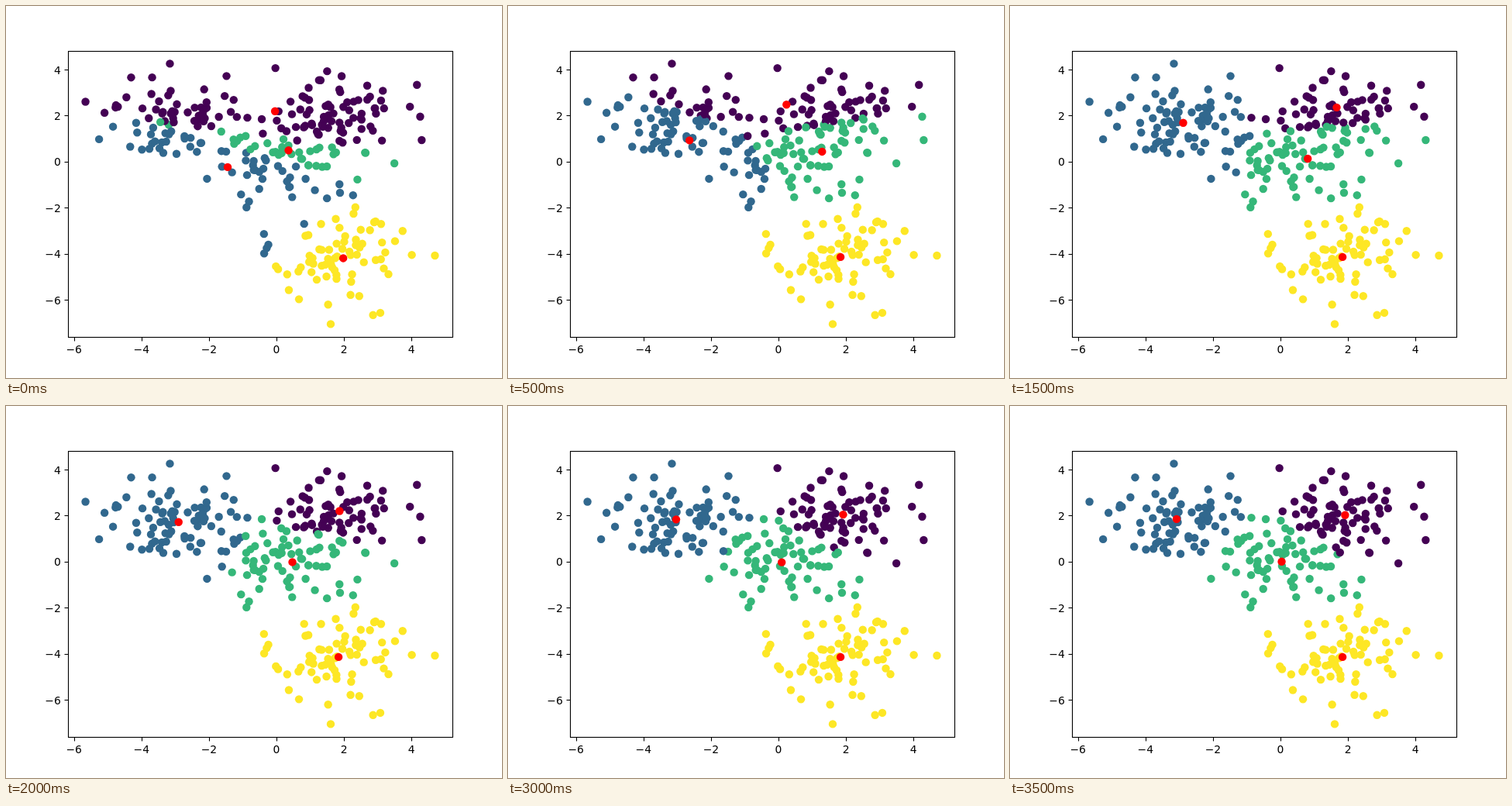
Write an HTML page that moves like this. It is 640 px wide and 480 px high and loops after 4.5 s.

```html
<!DOCTYPE html>
<html lang="en">
<head>
<meta charset="utf-8">
<title>k-means clustering</title>
<style>
  html, body { margin: 0; width: 100%; height: 100%; overflow: hidden; background: #fff; }
  svg { display: block; width: 640px; height: 480px; }
  text { font: 13.89px "DejaVu Sans", sans-serif; fill: #000; }
  .axes { fill: none; stroke: #000; stroke-width: 1.11; }
</style>
</head>
<body>
<svg id="plot" viewBox="0 0 640 480">
  <g id="dots"></g>
  <g id="means" fill="#f00"></g>
  <g id="ticks"><rect class="axes" x="80.5" y="58.5" width="496" height="369"/></g>
</svg>
<script>
const COLORS = ['#440154', '#31688e', '#35b779', '#fde725'];
const BLOBS = [[0, 0], [2, 2], [-3, 2], [2, -4]];
const SEEDS = [[0.835, 1.719], [0.395, -0.187], [0.5, 0.07], [3.54, -4.05]];
const PER_BLOB = 75, STEPS = 8, STEP_MS = 500, LOOP_MS = 4500;

// Mersenne Twister (MT19937), 32-bit output
function twister(seed) {
  const N = 624, mt = new Uint32Array(N);
  let at = N;
  mt[0] = seed;
  for (let i = 1; i < N; i++) {
    mt[i] = Math.imul(1812433253, mt[i - 1] ^ (mt[i - 1] >>> 30)) + i;
  }
  return () => {
    if (at === N) {
      for (let i = 0; i < N; i++) {
        const y = (mt[i] & 0x80000000) | (mt[(i + 1) % N] & 0x7fffffff);
        mt[i] = mt[(i + 397) % N] ^ (y >>> 1) ^ (y & 1 ? 0x9908b0df : 0);
      }
      at = 0;
    }
    let y = mt[at++];
    y ^= y >>> 11;
    y ^= (y << 7) & 0x9d2c5680;
    y ^= (y << 15) & 0xefc60000;
    y ^= y >>> 18;
    return y >>> 0;
  };
}

const next = twister(0);
const uniform = () => {
  const hi = next() >>> 5, lo = next() >>> 6;
  return (hi * 67108864 + lo) / 9007199254740992;
};

// Polar method: yields two normal deviates at once
function normalPair() {
  let a, b, r;
  do {
    a = 2 * uniform() - 1;
    b = 2 * uniform() - 1;
    r = a * a + b * b;
  } while (r >= 1 || r === 0);
  const f = Math.sqrt(-2 * Math.log(r) / r);
  return [f * b, f * a];
}

function below(max) {
  const mask = 2 ** (32 - Math.clz32(max)) - 1;
  let v;
  do v = next() & mask; while (v > max);
  return v;
}

const points = [];
for (const [cx, cy] of BLOBS) {
  for (let i = 0; i < PER_BLOB; i++) {
    const [dx, dy] = normalPair();
    points.push([cx + dx, cy + dy]);
  }
}
for (let i = points.length - 1; i > 0; i--) {
  const j = below(i);
  [points[i], points[j]] = [points[j], points[i]];
}

// k-means: label by nearest mean, then move the means
const dist = (p, q) => (p[0] - q[0]) ** 2 + (p[1] - q[1]) ** 2;
const nearest = (p, means) =>
  means.reduce((best, m, k) => dist(p, m) < dist(p, means[best]) ? k : best, 0);
const average = (list, axis) => list.reduce((sum, p) => sum + p[axis], 0) / list.length;

const states = [];
let means = SEEDS;
for (let s = 0; s < STEPS; s++) {
  const labels = points.map(p => nearest(p, means));
  means = means.map((_, k) => {
    const own = points.filter((_, i) => labels[i] === k);
    return [average(own, 0), average(own, 1)];
  });
  states.push({ labels, means });
}

// Axes span 80..576 by 57.6..427.2 with a 5% margin around the data
function scale(values, from, to) {
  const lo = Math.min(...values), hi = Math.max(...values);
  const pad = (to - from) / 22;
  return v => from + pad + (v - lo) / (hi - lo) * (to - from - 2 * pad);
}
const px = scale(points.map(p => p[0]), 80, 576);
const py = scale(points.map(p => p[1]), 427.2, 57.6);

function add(parent, tag, attrs, text = '') {
  const el = document.createElementNS('http://www.w3.org/2000/svg', tag);
  for (const name in attrs) el.setAttribute(name, attrs[name]);
  el.textContent = text;
  return document.getElementById(parent).appendChild(el);
}
const place = (el, [x, y]) => {
  el.setAttribute('cx', px(x).toFixed(2));
  el.setAttribute('cy', py(y).toFixed(2));
};
const addDot = parent => add(parent, 'circle', { r: 5.21 });

for (let v = -6; v <= 4; v += 2) {
  const label = String(v).replace('-', '\u2212');
  const x = px(v), y = py(v);
  add('ticks', 'path', { class: 'axes', d: `M${Math.round(x) + 0.5} 427.5v5` });
  add('ticks', 'path', { class: 'axes', d: `M80.5 ${Math.round(y) + 0.5}h-5` });
  add('ticks', 'text', { x, y: 448, 'text-anchor': 'middle' }, label);
  add('ticks', 'text', { x: 70.8, y: Math.round(y + 5.5), 'text-anchor': 'end' }, label);
}

const dots = points.map(p => {
  const dot = addDot('dots');
  place(dot, p);
  return dot;
});
const marks = COLORS.map(() => addDot('means'));

let shown = -1;
function show(step) {
  if (step === shown) return;
  shown = step;
  const { labels, means } = states[step];
  dots.forEach((dot, i) => dot.setAttribute('fill', COLORS[labels[i]]));
  marks.forEach((mark, k) => place(mark, means[k]));
}

function frame() {
  const t = performance.now() % LOOP_MS;
  show(Math.min(STEPS - 1, Math.floor(t / STEP_MS)));
  requestAnimationFrame(frame);
}
show(0);
requestAnimationFrame(frame);
</script>
</body>
</html>
```
